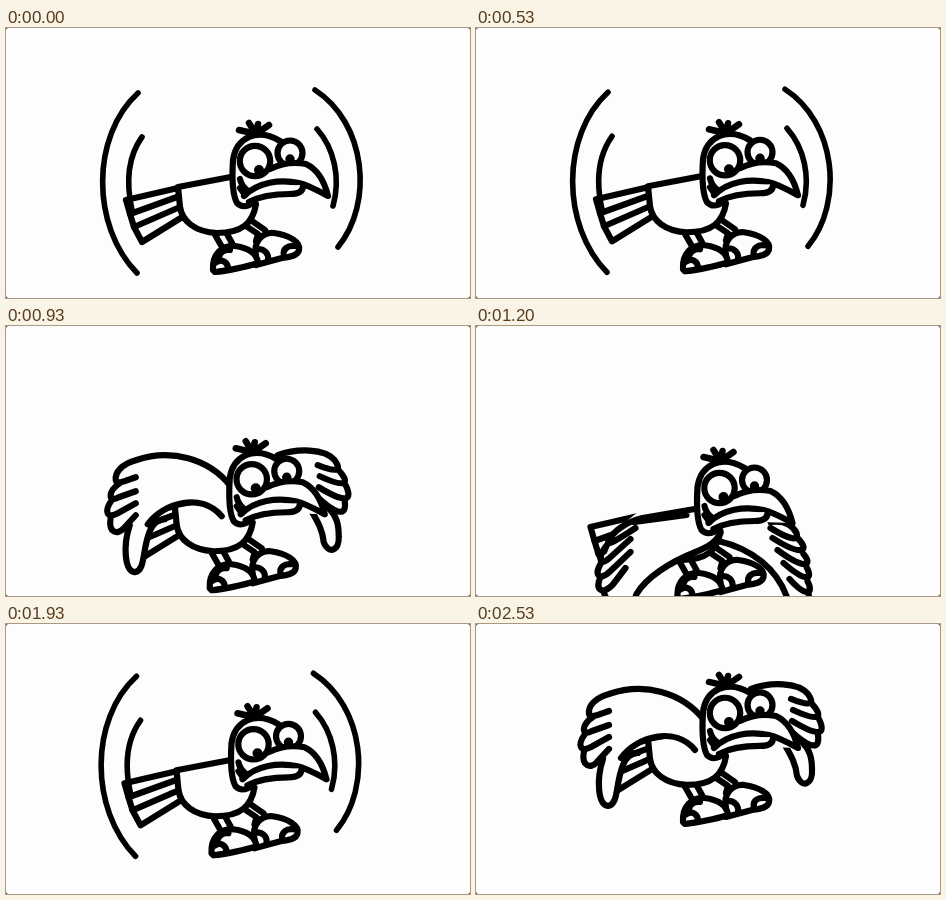
Recreate the animation shown at these times as an HTML page. Size 464 px wide and 270 px high, loop 2590 ms.

```html
<!DOCTYPE html>
<html lang="en">
<head>
<meta charset="utf-8">
<title>Flapping bird</title>
<style>
  html, body { margin: 0; width: 100%; height: 100%; overflow: hidden; background: #555; }
  svg { display: block; width: 100vw; height: 100vh; }
  #bird { fill: none; stroke: #000; stroke-width: 6.2; stroke-linecap: round; stroke-linejoin: round; }
  .w { fill: #fdfdfd; }
  .bare { fill: #fdfdfd; stroke: none; }
  .dot { fill: #000; stroke: none; }
  .pose { visibility: hidden; }
  .pose.on { visibility: visible; }
</style>
</head>
<body>
<svg viewBox="0 0 464 270">
  <rect width="464" height="270" rx="3" fill="#fdfdfd"/>
  <g id="bird">
    <!-- far wing -->
    <g class="pose up">
      <path class="bare" d="M266 104C284 88 291 70 293 45C296 36 304 38 304 48L304 68L313 84L312 100L305 124Z"/>
      <path d="M266 104C284 88 291 70 293 46C294 36 304 38 304 48C304 60 302 68 298 76M303 69C312 66 310 83 297 93M309 82C319 83 313 98 299 106M312 97C317 105 310 115 300 118M309 114C312 120 309 124 303 126"/>
    </g>
    <g class="pose down">
      <path class="bare" d="M248 186C282 194 306 214 316 241C318 264 322 283 330 283C339 280 337 240 334 205L326 176L300 160Z"/>
      <path d="M300 167C314 165 322 170 326 178C329 187 318 184 300 173M327 183C340 196 332 202 302 183M333 199C343 211 334 215 307 195M336 212C343 225 336 228 313 208M337 226C344 240 335 242 319 224M338 238C341 258 338 283 330 283C321 281 320 258 316 241C306 214 282 194 248 186"/>
    </g>
    <g class="pose fold">
      <path class="bare" d="M275 109C296 101 322 103 333 115L344 135L345 152L338 170L337 192Q330 212 323 199C321 184 314 174 306 160L290 150Z"/>
      <path d="M275 109C294 102 322 102 332 114C339 124 335 127 315 119M336 124C347 136 345 143 317 130M343 139C350 154 344 158 316 141M342 155C344 169 336 170 316 152M306 160C314 174 320 183 321 196C326 209 337 204 336 190C336 178 334 170 326 162"/>
    </g>

    <!-- tail -->
    <path class="w" d="M172 160L120 172L124 186L128 199L136 214L178 188Z"/>
    <path d="M124 186L171 169M128 199L174 179"/>

    <!-- legs and feet -->
    <path d="M208 205L216 219M221 206L226 215M240 198L252 206L250 213M246 193L259 202"/>
    <path class="w" d="M250 228C247 214 256 204 268 205C283 207 295 214 293 222C292 228 284 229 276 230L250 237Z"/>
    <path class="w" d="M207 242C206 226 216 217 229 218C243 220 251 226 252 235C240 239 220 243 209 244Z"/>
    <path d="M209 235C216 230 222 234 222 241M224 222C218 221 214 225 213 229M252 221C259 221 263 226 262 232M278 228C276 221 282 217 289 218"/>

    <!-- body -->
    <path class="w" d="M172 159L230 148L250 176C247 195 236 205 211 205C189 204 176 193 174 179Z"/>

    <!-- near wing -->
    <g class="pose up">
      <path class="bare" d="M228 130C186 108 158 82 148 45Q141 30 135 45L137 68L131 88L132 106L138 128Q143 150 160 155L213 164Z"/>
      <path d="M228 130C186 108 156 82 148 45C146 34 135 35 135 45C134 62 138 74 149 82M139 68C127 67 130 88 157 104M135 86C124 91 139 110 160 121M135 104C126 111 141 128 162 137M138 122C131 130 149 145 170 148M143 139C144 151 158 156 168 158C184 163 195 166 213 164"/>
    </g>
    <g class="pose down">
      <path class="bare" d="M230 144L170 155L146 174L130 214L128 228L134 240C144 262 150 282 160 284C166 280 160 260 166 239C176 222 200 207 225 197Q244 188 250 178Z"/>
      <path d="M230 153L172 163C155 167 142 177 138 186C135 193 152 181 165 173M139 187C126 201 128 213 139 203L160 184M132 206C122 220 129 227 140 216L160 197M130 222C124 235 132 240 142 230L155 213M133 237C143 258 148 284 160 284C166 281 158 260 166 239C176 222 200 207 225 197C240 191 246 186 250 178M164 167L216 160"/>
    </g>
    <g class="pose fold">
      <path class="bare" d="M228 140C205 112 170 103 135 114L114 122L108 144L105 161L107 177L122 190C119 207 124 226 132 226C143 225 138 208 150 180C163 157 198 147 219 171Z"/>
      <path d="M228 140C206 112 168 102 133 114C119 118 112 126 113 134C114 139 124 134 133 131M117 137C105 145 105 157 116 151L133 145M109 154C101 165 104 173 115 167L133 157M108 171C105 187 115 189 121 182L133 169M127 179C120 200 122 225 132 226C143 224 139 205 147 185C150 178 154 173 162 173M145 178C161 156 199 146 219 170"/>
    </g>

    <!-- head -->
    <path class="bare" d="M230 178C222 150 224 107 254 107Q276 107 286 130L300 137L322 168L290 167L247 175Z"/>
    <path d="M274 113C251 99 230 110 227 132C226 148 226 166 231 175C237 181 243 178 249 173"/>
    <path d="M233 102L250 106L243 95M250 106L252 96M250 106L263 97" stroke-width="6.5"/>
    <circle class="w" cx="284" cy="125" r="12.5"/>
    <circle class="dot" cx="284" cy="131" r="4.7"/>
    <path class="bare" d="M262 144C274 135 290 134 300 136C313 142 319 156 322 168L293 156Q255 152 240 165Z"/>
    <path d="M264 141C276 135 290 134 300 136C313 142 319 156 322 168C311 162 302 157 293 155C274 151 252 154 238 168"/>
    <path class="bare" d="M243 172Q255 157 296 157Q297 166 284 166Z"/>
    <path d="M243 174C256 167 270 166 284 166C292 166 297 164 297 158"/>
    <circle class="w" cx="249" cy="133" r="15.2"/>
    <circle class="dot" cx="253" cy="142" r="5"/>
    <path d="M234 151C235 157 238 160 242 163M234 160L239 167"/>

    <!-- sweep lines -->
    <g class="pose sweep" stroke-width="5.6">
      <path d="M132 65C85 108 85 198 131 245M136 109C121 130 120 155 126 182M309 62C360 95 368 175 332 219M311 101C328 120 335 150 327 178"/>
    </g>
  </g>
</svg>
<script>
  const LOOP = 2590, FLAP = 320;
  // [start within one flap in ms, pose]
  const poses = [[0, 'sweep'], [60, 'up'], [150, 'sweep'], [215, 'down'], [265, 'fold']];
  // [time, x, y] of the whole bird
  const keys = [[0, 0, 0], [330, 0, -1.5], [730, 0, 0], [1067, -5, 31], [1200, -5.5, 29],
    [1400, -4, 32], [1600, -3, 34.5], [2267, 0, -60], [2330, 0, -60], [2540, 0, -44]];
  const bird = document.getElementById('bird');
  const layers = [...document.querySelectorAll('.pose')];
  const start = performance.now();
  let lastStep = -1;

  function place(t) {
    const i = keys.findIndex(k => k[0] > t);
    const [t0, x0, y0] = keys[i - 1], [t1, x1, y1] = keys[i];
    const u = (t - t0) / (t1 - t0), e = u * u * (3 - 2 * u);
    return [x0 + (x1 - x0) * e, y0 + (y1 - y0) * e];
  }

  function draw() {
    // 15 pictures a second, on a 10 ms clock
    const now = (performance.now() - start) % LOOP;
    const step = Math.floor((now / 10 + 0.5) * 0.15);
    if (step !== lastStep) {
      lastStep = step;
      const t = step * 200 / 3;
      const pose = poses.filter(p => p[0] <= t % FLAP).pop()[1];
      bird.setAttribute('transform', `translate(${place(t)})`);
      layers.forEach(l => l.classList.toggle('on', l.classList.contains(pose)));
    }
    requestAnimationFrame(draw);
  }
  draw();
</script>
</body>
</html>
```
